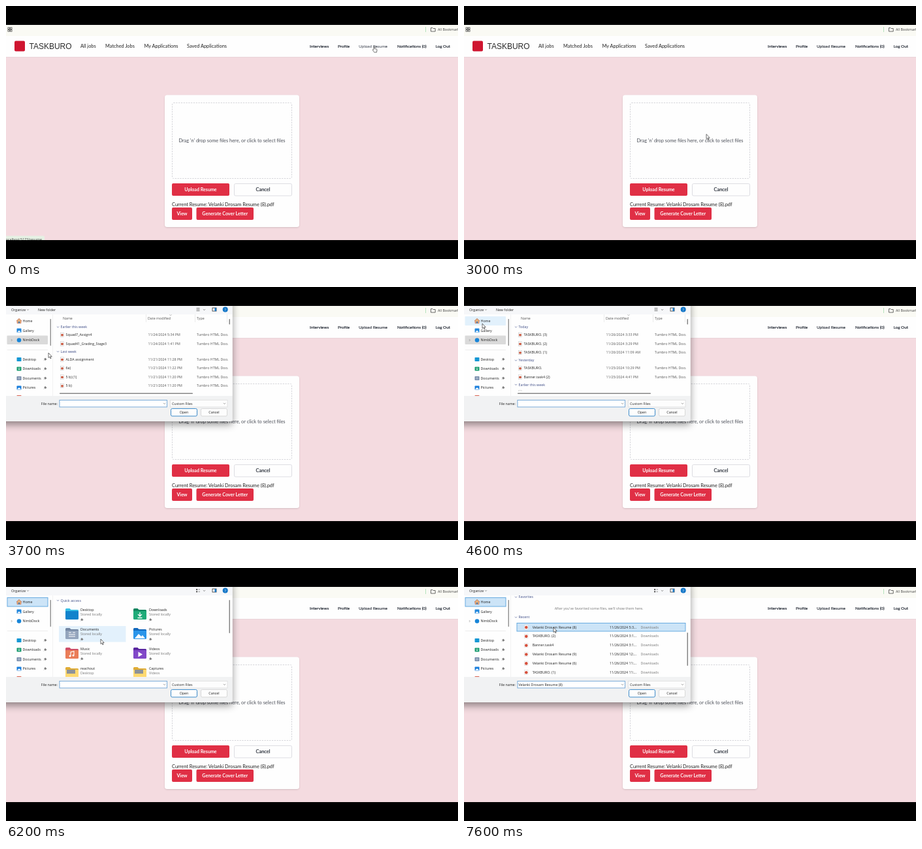
An HTML page for the animation above (8000 ms loop, 692 by 388 pixels).

```html
<!DOCTYPE html>
<html lang="en">
<head>
<meta charset="utf-8">
<title>Resume upload</title>
<style>
html, body { margin: 0; width: 100%; height: 100%; overflow: hidden; background: #000; }
svg { display: block; width: 100vw; height: 100vh; }
text { white-space: pre; }
.web { font-family: Lato, "Open Sans", sans-serif; }
.sys { font-family: "Open Sans", "Noto Sans", sans-serif; }
.brand { font-family: "Liberation Sans", Arial, sans-serif; }
.cut { animation: 8s step-end infinite; }
.status { animation-name: status; }
.link { animation-name: link; }
.dialog { animation-name: dialog; }
.details { animation-name: details; }
.home { animation-name: home; }
.early { animation-name: early; }
.today { animation-name: today; }
.tree-hover { animation-name: tree-hover; }
.tile-hover { animation-name: tile-hover; }
.row-hover { animation-name: row-hover; }
.picked { animation-name: picked; }
.hand { animation-name: hand; }
.arrow { animation-name: arrow; }
.scroll { animation: scroll 8s ease-out infinite; }
.thumb { animation: thumb 8s ease-out infinite; }
.pointer { animation: pointer 8s linear infinite; }
@keyframes status { 0% { opacity: 1 } 6.2% { opacity: 0 } }
@keyframes link { 0% { fill: #7d828c } 4.3% { fill: #1f2530 } }
@keyframes dialog { 0% { opacity: 0 } 38.7% { opacity: 1 } }
@keyframes details { 0% { opacity: 1 } 63.7% { opacity: 0 } }
@keyframes home { 0% { opacity: 0 } 63.7% { opacity: 1 } }
@keyframes early { 0% { opacity: 1 } 48.7% { opacity: 0 } }
@keyframes today { 0% { opacity: 0 } 48.7% { opacity: 1 } }
@keyframes tree-hover { 0% { opacity: 0 } 52.4% { opacity: 1 } 63.7% { opacity: 0 } }
@keyframes tile-hover { 0% { opacity: 0 } 71.2% { opacity: 1 } 82.4% { opacity: 0 } }
@keyframes row-hover { 0% { opacity: 0 } 88.7% { opacity: 1 } 94.9% { opacity: 0 } }
@keyframes picked { 0% { opacity: 0 } 94.9% { opacity: 1 } }
@keyframes hand { 0% { opacity: 1 } 4.3% { opacity: 0 } }
@keyframes arrow { 0% { opacity: 0 } 4.3% { opacity: 1 } }
@keyframes scroll { 0%, 82% { transform: translateY(0) } 88%, 100% { transform: translateY(-138px) } }
@keyframes thumb { 0%, 82% { transform: translateY(0) } 88%, 100% { transform: translateY(50px) } }
@keyframes pointer {
  0%, 3.1% { transform: translate(561px, 61.5px) }
  8.6%, 39% { transform: translate(371px, 196.5px) }
  41.2%, 43.2% { transform: translate(300px, 168px) }
  46.1%, 47% { transform: translate(65px, 101px) }
  53.5% { transform: translate(27px, 58px) }
  57%, 68.4% { transform: translate(28px, 56px) }
  71.5%, 82.4% { transform: translate(145px, 109px) }
  88.7%, 100% { transform: translate(137px, 91px) }
}
</style>
</head>
<body>
<svg id="stage" viewBox="0 0 692 388" preserveAspectRatio="none"></svg>
<script>
const INK = '#222';
const BLUE = '#3d4c86';
const RED = '#e02f45';
const PERSON = 'Velanki Drosam';
const SITE = 'TASKBURO';

const rect = (x, y, w, h, fill, more = '') =>
  `<rect x="${x}" y="${y}" width="${w}" height="${h}" fill="${fill}" ${more}/>`;
const line = (d, color = '#666', width = .7, more = '') =>
  `<path d="${d}" fill="none" stroke="${color}" stroke-width="${width}" ${more}/>`;
const dot = (x, y, r, fill) => `<circle cx="${x}" cy="${y}" r="${r}" fill="${fill}"/>`;
const group = (cls, ...parts) => `<g class="${cls}">${parts.join('')}</g>`;
const clip = (id, ...parts) => `<g clip-path="url(#${id})">${parts.join('')}</g>`;

// y is the middle of the capitals
const label = (cls, size) => (x, y, str, fill = INK, more = '') =>
  `<text class="${cls}" x="${x}" y="${y + size * .35}" font-size="${size}" fill="${fill}" ${more}>${str}</text>`;
const web = label('web', 7.4);
const nav = label('web', 6.4);
const bold = label('web', 7.1);
const sys = label('sys', 5.3);
const MID = 'text-anchor="middle"';
const MEDIUM = 'stroke="#1f2530" stroke-width=".16"';

const chevron = (x, y, color = '#666') => line(`M${x - 1.6} ${y - .8}l1.6 1.6 1.6-1.6`, color, .6);
const pin = (x, y) =>
  `<path d="M${x} ${y - 2.2}l2.2 2.2-.8.3-1 1.3-2-2 1.300-1zM${x - .8} ${y + .8}l-1.300 1.300" fill="#777" stroke="#777" stroke-width=".5"/>`;

function page() {
  const button = (x, y, w, str) =>
    rect(x, y, w, 19, RED, 'rx="2"') + bold(x + w / 2, y + 9.5, str, '#fff', `${MID} font-weight="700"`);
  const left = [[114, 'All jobs'], [152, 'Matched Jobs'], [211.5, 'My Applications'], [277, 'Saved Applications']];
  const right = [[465, 'Interviews'], [508, 'Profile'], [599, 'Notifications (0)'], [657.5, 'Log Out']];
  return [
    rect(0, 29, 692, 17, '#fafaf4'),
    rect(0, 46, 692, 32, '#fefefe'),
    rect(0, 78, 692, 281, '#f4dbe0'),
    rect(0, 78, 692, 1, '#ead3d8'),
    [[3, 33], [6.6, 33], [3, 36.6], [6.6, 36.6]].map(([x, y]) =>
      rect(x, y, 2.4, 2.4, 'none', 'stroke="#444" stroke-width=".8"')).join(''),
    line('M642.500 32v8', '#b5e3bd', 1),
    line('M650.500 33.500h2.500l1 1h3.200v4.500h-6.700z', '#444', .8),
    sys(661, 36, 'All Bookmarks', '#444'),
    rect(13, 53.5, 16, 16, '#cf1530', 'rx="2"'),
    label('brand', 12)(35.5, 61.8, SITE, '#2b2b2b'),
    left.map(([x, str]) => web(x, 61.7, str)).join(''),
    right.map(([x, str]) => nav(x, 61.7, str, '#1f2530', MEDIUM)).join(''),
    group('cut link', nav(540, 61.7, 'Upload Resume', 'inherit', 'stroke="#1f2530" stroke-width=".1"')),
    rect(243, 136.5, 206, 202.5, '#fefefe', 'rx="4" filter="url(#card)"'),
    rect(254.5, 148.5, 183, 116, 'none', 'rx="2" stroke="#d3d3d8" stroke-dasharray="2.200 1.600"'),
    web(346, 206.3, "Drag 'n' drop some files here, or click to select files", '#4b4f58', MID),
    button(254, 272, 88, 'Upload Resume'),
    rect(349.5, 272.5, 88, 18.5, '#fefefe', 'rx="2" stroke="#dddde2"'),
    web(393.5, 281.7, 'Cancel', '#1f2530', `${MID} ${MEDIUM}`),
    web(254, 304, `Current Resume: ${PERSON} Resume (8).pdf`),
    button(254, 309, 31, 'View'),
    button(291.5, 309, 87.5, 'Generate Cover Letter'),
    group('cut status',
      rect(-4, 352.5, 63, 12, '#e6f1e4', 'rx="2"'),
      sys(-1.5, 358, 'localhost:5173/resume', '#444')),
  ].join('');
}

function tree() {
  const pinned = [['Desktop', 111, '#1597d4'], ['Downloads', 125.5, '#1a9c70'],
    ['Documents', 140, '#7288a8'], ['Pictures', 154.5, '#1b7fdc']];
  return clip('tree',
    group('cut details', rect(1.5, 74.5, 62.5, 13.5, '#dadada', 'rx="1"')),
    group('cut tree-hover', rect(1.5, 45, 62.5, 14, '#e2f1fc', 'rx="1"')),
    group('cut home', rect(2, 45.5, 62, 13.5, '#cce4f7', 'stroke="#5ba4dd" stroke-width=".9"')),
    `<path d="M16 52l4-3.700 4 3.700h-1v3.500h-6v-3.500z" fill="#e4b07c" stroke="#b85c48" stroke-width=".6"/>`,
    rect(19, 53, 2, 2.5, '#3c78b4'),
    sys(25.5, 52, 'Home'),
    rect(16.5, 63.5, 7, 6.5, '#2488dc', 'rx="1"'),
    `<path d="M17 69.500l3-3 3 3z" fill="#fff"/>`,
    sys(25.5, 67, 'Gallery'),
    line('M7.800 80l1.500 1.500-1.500 1.500', '#777', .6),
    dot(20, 81.5, 3.3, '#1785d8'),
    sys(25.5, 81.5, 'NimbDock'),
    line('M2 96.500h62', '#e6e6e6', .7),
    pinned.map(([str, y, c], i) =>
      rect(16.5, y - 3, 7, 6, c, 'rx=".8"') +
      (i === 1 ? line(`M20 ${y - 2}v3.500m-1.500-1.500l1.500 1.500 1.500-1.500`, '#fff', .7) : '') +
      (i === 2 ? line(`M18 ${y - 1}h4m-4 2h4`, '#fff', .6) : '') +
      (i === 3 ? `<path d="M17 ${y + 2.5}l3-3 3 3z" fill="#fff"/>` : '') +
      sys(25.5, y, str) + pin(60, y)).join(''),
    rect(16.5, 166, 7, 6, '#d8614f', 'rx=".8"'),
    rect(67.6, 49, 1.3, 41, '#858585', 'rx=".6"'));
}

function details() {
  const head = (y, str) => chevron(79.5, y, BLUE) + sys(83.5, y, str, BLUE);
  const row = ([y, name, date]) =>
    rect(83.5, y - 3.2, 5, 6.4, '#fff', 'stroke="#bbb" stroke-width=".5"') + dot(86, y + .3, 1.9, '#c9583f') +
    sys(91.5, y, name) + sys(217.5, y, date, '#555') + sys(292, y, 'Tumbro HTML Docu', '#555');
  const early = [[73.3, 'Squad7_Assign4', '11/24/2024 5:34 PM'], [87, 'Squad41_Grading_Stage3', '11/24/2024 1:41 PM'],
    [111, 'ALDA assignment', '11/21/2024 11:28 PM'], [124.5, '6a)', '11/21/2024 11:22 PM'],
    [138, '5 b) (1)', '11/21/2024 11:20 PM'], [151.5, '5 b)', '11/21/2024 11:20 PM']];
  const today = [[73.3, SITE + '. (3)', '11/26/2024 3:33 PM'], [87, SITE + '. (2)', '11/26/2024 3:29 PM'],
    [100.5, SITE + '. (1)', '11/26/2024 11:09 AM'], [124.5, SITE + '.', '11/25/2024 10:29 PM'],
    [138, 'Banner.task4 (2)', '11/25/2024 4:41 PM'], [162, '', '']];
  return group('cut details',
    sys(49, 34.8, 'New folder'),
    line('M291.500 32.500h5m-5 2h5m-5 2h5', '#555', .7),
    clip('rows',
      sys(87, 48, 'Name', '#555'), sys(217, 48, 'Date modified', '#555'), sys(292, 48, 'Type', '#555'),
      line('M214.500 42v12M289.500 42v12M338.500 42v12', '#e2e2e2', .7),
      chevron(252, 43, '#888'),
      group('cut early', head(61.3, 'Earlier this week'), head(99, 'Last week'), early.map(row).join('')),
      group('cut today', head(61.3, 'Today'), head(112.5, 'Yesterday'), head(149.7, 'Earlier this week'),
        today.map(row).join(''))),
    rect(72, 160, 268, 7, '#fefefe'),
    rect(82, 162.6, 204, 1.3, '#858585', 'rx=".6"'),
    rect(341.5, 49, 1.5, 8.5, '#858585', 'rx=".7"'));
}

function folder(x, y, back, front, mark) {
  return `<g transform="translate(${x} ${y})">
    <path d="M0 1.500Q0 0 1.500 0H6.500l2 2h10Q20 2 20 3.500V14H0z" fill="${back}"/>
    <path d="M0 5q0-1 1-1h18q1 0 1 1v10.500q0 1.500-1.500 1.500h-17Q0 17 0 15.500z" fill="${front}"/>${mark}</g>`;
}

function home() {
  const solid = d => `<path d="${d}" fill="#fff"/>`;
  const preview = rect(2, 4, 13, 6, '#8d9299') + rect(0, 10, 20, 6, '#ffd970');
  const tiles = [
    ['Desktop', '#37bfe6', '#1183cc', ''],
    ['Downloads', '#12855f', '#1fab79', line('M10 6v6m-3-3l3 3 3-3M6.500 14.500h7', '#fff', 1.3)],
    ['Documents', '#7487a3', '#94a5bd', line('M5 7h4m-4 3h10m-10 3h10M11 7h4', '#fff', 1.2)],
    ['Pictures', '#1269bd', '#2b95ea', solid('M2 16l6-7 4 4 2-2 4 5z')],
    ['Music', '#cf4f68', '#ea7d58', line('M8 13V7l5-1.300v6', '#fff', 1.1) + dot(7, 13, 1.5, '#fff') + dot(12, 12, 1.5, '#fff')],
    ['Videos', '#5a26a0', '#8148c8', solid('M7.500 6.500l6.500 4-6.500 4z')],
    ['reachout', '#e0ac35', '#ffd970', preview, 'Desktop'],
    ['Captures', '#e0ac35', '#ffd970', preview, 'Videos'],
  ];
  const tile = ([name, back, front, mark, place = 'Stored locally'], i) => {
    const x = i % 2 ? 195 : 91, y = 70.5 + 30 * (i >> 1), tx = i % 2 ? 219 : 114;
    return folder(x, y - 8.5, back, front, mark) + sys(tx, y - 6.7, name) +
      sys(tx, y + 1, place, '#777') + pin(tx + 2, y + 9);
  };
  const recent = [[PERSON + ' Resume (8)', '5:3...'], [SITE + '. (2)', '3:1...'], ['Banner.task4', '3:1...'],
    [PERSON + ' Resume (9)', '12:...'], [PERSON + ' Resume (6)', '11:...'], [SITE + '. (1)', '11:...']];
  const row = ([name, time], i) => {
    const y = 228.7 + 13.85 * i;
    return rect(92.5, y - 3.2, 5.5, 6.6, '#fff', 'stroke="#ccc" stroke-width=".4"') + dot(95.3, y + .3, 2.3, '#d6503c') +
      sys(104.7, y, name) + sys(223, y, '11/26/2024 ' + time) + sys(270.5, y, 'Downloads', '#777');
  };
  const head = (y, str) => chevron(79.5, y, BLUE) + sys(83.5, y, str, BLUE);
  return group('cut home',
    rect(291, 32, 2.2, 2, '#555') + rect(291, 35.3, 2.2, 2, '#555'),
    line('M294.500 33h2.500m-2.500 3.300h2.500', '#555', .6),
    clip('rows', group('scroll',
      group('cut tile-hover', rect(81, 89, 102.5, 24.5, '#e3f1fc')),
      head(49.7, 'Quick access'),
      tiles.map(tile).join(''),
      head(182.5, 'Favorites'),
      sys(206.5, 199.8, "After you've favorited some files, we'll show them here.", '#777', MID),
      head(213.5, 'Recent'),
      group('cut row-hover', rect(81, 222.5, 258, 12.5, '#e3f1fc')),
      group('cut picked', rect(81, 222.5, 258, 12.5, '#cce4f7', 'stroke="#5ba4dd" stroke-width=".9"')),
      recent.map(row).join(''))),
    group('thumb', rect(341.5, 49, 1.5, 51, '#858585', 'rx=".7"')));
}

function dialog() {
  const button = (x, str, edge) =>
    rect(x, 186.5, 40, 11.5, '#fdfdfd', `rx="2" stroke="${edge}" stroke-width=".9"`) + sys(x + 20, 192.3, str, INK, MID);
  return group('cut dialog', clip('screen',
    `<path d="M-20 20H346.500V203q0 3-3 3H-20z" fill="#f1f2f3" filter="url(#drop)"/>`,
    rect(0, 29, 346.5, 13, '#f6f7f9'),
    rect(0, 42, 346.5, 125, '#fefefe'),
    line('M71.500 42v125', '#ececec', .7),
    sys(8, 34.8, 'Organize'), chevron(33.5, 34.8),
    chevron(303.5, 34.8, '#444'),
    rect(316, 32, 6, 5, 'none', 'stroke="#333" stroke-width=".8"'), rect(319.5, 32, 2.5, 5, '#1c78c4'),
    dot(335.7, 34.6, 4, '#1477c8'), sys(335.7, 34.7, '?', '#fff', MID),
    tree(), details(), home(),
    sys(79, 178.7, 'File name:', INK, 'text-anchor="end"'),
    rect(82, 173.5, 164.5, 10.5, '#fff', 'stroke="#6da3d4" stroke-width=".9"'),
    chevron(242.5, 178.7),
    group('cut picked', sys(83.5, 178.7, PERSON + ' Resume (8)')),
    rect(251.5, 173.5, 87.5, 10.5, '#fdfdfd', 'stroke="#dcdcdc" stroke-width=".8"'),
    sys(254, 178.7, 'Custom Files'), chevron(334.5, 178.7),
    button(252.5, 'Open', '#2a7fc6'),
    button(298.5, 'Cancel', '#d4d4d4')));
}

const pointer = () => group('pointer',
  group('cut hand', `<path d="M2 5.200V1a.8.8 0 0 1 1.600 0V4l2.600.6q1 .3.8 1.400L6.400 9.500H2.800L.6 6.500Q0 5 1 5z"
    fill="#fff" stroke="#333" stroke-width=".7"/>`),
  group('cut arrow', `<path d="M0 0V7.500L1.700 6 2.900 8.700 4.100 8.200 2.900 5.600H5.200z"
    fill="#fff" stroke="#333" stroke-width=".7"/>`));

const area = (id, x, y, w, h) => `<clipPath id="${id}">${rect(x, y, w, h, '#000')}</clipPath>`;
const shadow = (id, dy, blur, alpha) =>
  `<filter id="${id}" x="-20%" y="-20%" width="140%" height="150%">
    <feDropShadow dx="0" dy="${dy}" stdDeviation="${blur}" flood-color="#000" flood-opacity="${alpha}"/></filter>`;

document.getElementById('stage').innerHTML =
  `<defs>${area('screen', 0, 29, 692, 330)}${area('tree', 0, 42, 71, 125)}${area('rows', 72, 42, 267.5, 125)}
  ${shadow('card', 1, 1.2, .14)}${shadow('drop', 5, 6, .42)}</defs>` +
  rect(0, 0, 692, 388, '#000') + clip('screen', page()) + dialog() + pointer();
</script>
</body>
</html>
```
